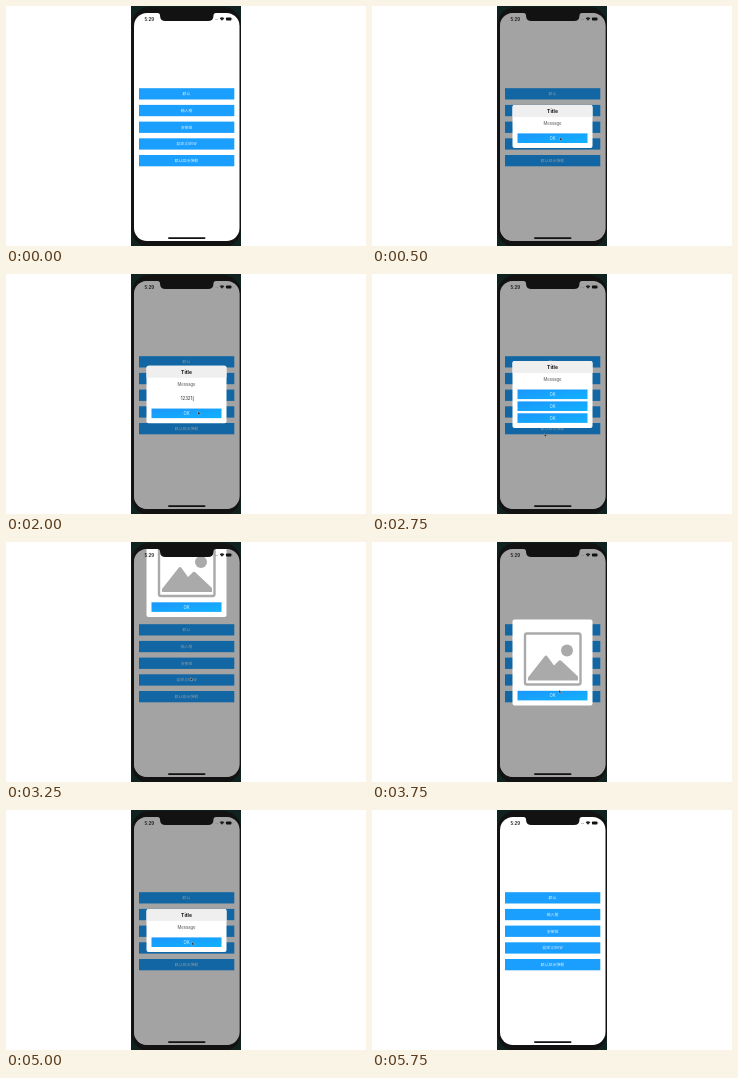
Recreate the animation shown at these times as an HTML page. Size 360x240 px, loop 6 s.

```html
<!DOCTYPE html>
<html lang="zh">
<head>
<meta charset="utf-8">
<style>
html, body { margin: 0; width: 100%; height: 100%; overflow: hidden; background: #fff; }
svg { display: block; width: 360px; height: 240px; }
text { text-anchor: middle; font-family: Inter, "Liberation Sans", sans-serif; }
.label { font: 3.9px "Noto Sans CJK SC", "Noto Sans CJK", sans-serif; fill: #d9efff; }
.title { font-size: 5px; font-weight: 700; fill: #111; }
.msg { font-size: 4.2px; fill: #555; }
.input { font-size: 4.4px; fill: #222; }
.ok { font-size: 4.3px; fill: #d5f0ff; }
</style>
</head>
<body>
<svg viewBox="0 0 360 240">
  <defs>
    <linearGradient id="blue" x1="0" y1="0" x2="1" y2="1">
      <stop offset="0" stop-color="#1b96fb"/>
      <stop offset="1" stop-color="#12b2ff"/>
    </linearGradient>
    <clipPath id="screen"><rect x="128" y="7" width="105.5" height="228" rx="13"/></clipPath>
  </defs>
  <rect x="125" width="110" height="240" fill="#10221f"/>
  <rect x="125.5" y="1" width="109.5" height="240" rx="18" fill="#121212"/>
  <g clip-path="url(#screen)">
    <rect x="128" y="7" width="106" height="228" fill="#fff"/>
    <g id="buttons"></g>
    <rect id="dim" x="128" y="7" width="106" height="228" opacity=".36"/>
    <g id="dialog"></g>
    <text x="143.3" y="14.8" font-size="4.4" font-weight="600" fill="#111">5:29</text>
    <path d="M209.5 13.5h.8m.5 0h.8" stroke="#777" stroke-width=".8"/>
    <path d="M213.6 12.2Q216 10.2 218.4 12.2L216 14.7Z" fill="#222"/>
    <rect x="220" y="11.6" width="5.4" height="2.9" rx=".7" fill="#111"/>
    <path d="M225.9 12.5v1.1" stroke="#555" stroke-width=".5"/>
    <path d="M151.500 7Q154 7 154 9.500Q154 15 159.500 15H202Q207.500 15 207.500 9.500Q207.500 7 210 7Z" fill="#121212"/>
    <rect x="162" y="231.300" width="37.500" height="1.600" rx=".8" fill="#111"/>
  </g>
  <path id="cursor" d="M0 0V3.300L.8 2.600L1.300 3.700L1.900 3.400L1.400 2.400H2.400Z" fill="#111" stroke="#fff" stroke-width=".25"/>
</svg>
<script>
const $ = id => document.getElementById(id);
const STEP = 250, LOOP = 6000;
const CENTER = 120.5;

const rect = (x, y, w, h, fill, rx = 0) =>
  `<rect x="${x}" y="${y}" width="${w}" height="${h}" rx="${rx}" fill="${fill}"/>`;
const text = (cls, y, s) => `<text class="${cls}" x="180.5" y="${y}">${s}</text>`;
const okButton = y => rect(145.5, y, 70, 9.6, 'url(#blue)') + text('ok', y + 6.4, 'OK');

$('buttons').innerHTML = ['默认', '输入框', '多按钮', '自定义View', '默认显示弹框']
  .map((s, i) => rect(133, 82.2 + i * 16.7, 95.3, 11.3, '#1b9fff') + text('label', 89.3 + i * 16.7, s))
  .join('');

function panel(height, body, shift = 0) {
  return `<g transform="translate(0 ${CENTER - height / 2 + shift})">` +
    rect(140.5, 0, 80, height, '#fff', 2) + body + '</g>';
}

function alertBox({ input, buttons = 1 }) {
  const first = input === undefined ? 28.5 : 42.8;
  let body = '<path d="M140.500 12V2q0-2 2-2h76q2 0 2 2V12Z" fill="#efefef"/>' +
    text('title', 8.3, 'Title') + text('msg', 20.4, 'Message');
  if (input !== undefined) {
    const caret = 180.8 + input.length * 1.3;
    body += text('input', 34.7, input) +
      `<path d="M${caret} 30.500v5" stroke="#345" stroke-width=".6"/>`;
  }
  for (let i = 0; i < buttons; i++) body += okButton(first + i * 11.9);
  return panel(first + buttons * 11.9 + 2.8, body);
}

function pictureBox(shift) {
  return panel(86,
    '<rect x="153" y="14" width="55.500" height="51" rx="2" fill="none" stroke="#aaa" stroke-width="2.400"/>' +
    '<circle cx="195" cy="31" r="6" fill="#aaa"/>' +
    '<path d="M156 61V58L172.500 37Q174 35 175.500 37L182 46L186.500 41.500Q188 40 189.500 41.500L206 57V61Z" fill="#aaa"/>' +
    okButton(71.3), shift);
}

const plain = () => alertBox({});
const typed = input => () => alertBox({ input });
const triple = () => alertBox({ buttons: 3 });
const picture = shift => () => pictureBox(shift);

// One pose per step: dialog (if any), then pointer position (if any)
const poses = [
  [], [null, 186, 88],
  [plain, 188, 131.5], [plain, 188, 131.5],
  [typed(''), 187, 106], [typed(''), 188, 125], [typed('12'), 190, 132], [typed('123'), 192, 137], [typed('12321'), 192, 137.5],
  [null, 192, 137.5], [null, 187, 121],
  [triple, 172.5, 159.5], [triple, 180, 146],
  [picture(-88.5), 184.5, 135.5], [picture(0), 185, 138], [picture(0), 187, 148], [picture(0), 187, 155],
  [null, 190, 158],
  [plain, 190, 158], [plain, 188, 140], [plain, 186, 132],
  [null, 186, 132], [null, 185, 150], []
];

let shown = -1;
function draw(time) {
  const step = Math.floor((time % LOOP) / STEP);
  if (step !== shown) {
    shown = step;
    const [dialog, x, y] = poses[step];
    $('dim').style.display = dialog ? '' : 'none';
    $('dialog').innerHTML = dialog ? dialog() : '';
    $('cursor').style.display = x ? '' : 'none';
    if (x) $('cursor').setAttribute('transform', `translate(${x} ${y})`);
  }
}

const start = performance.now();
function tick() {
  draw(performance.now() - start);
  requestAnimationFrame(tick);
}
tick();
</script>
</body>
</html>
```
